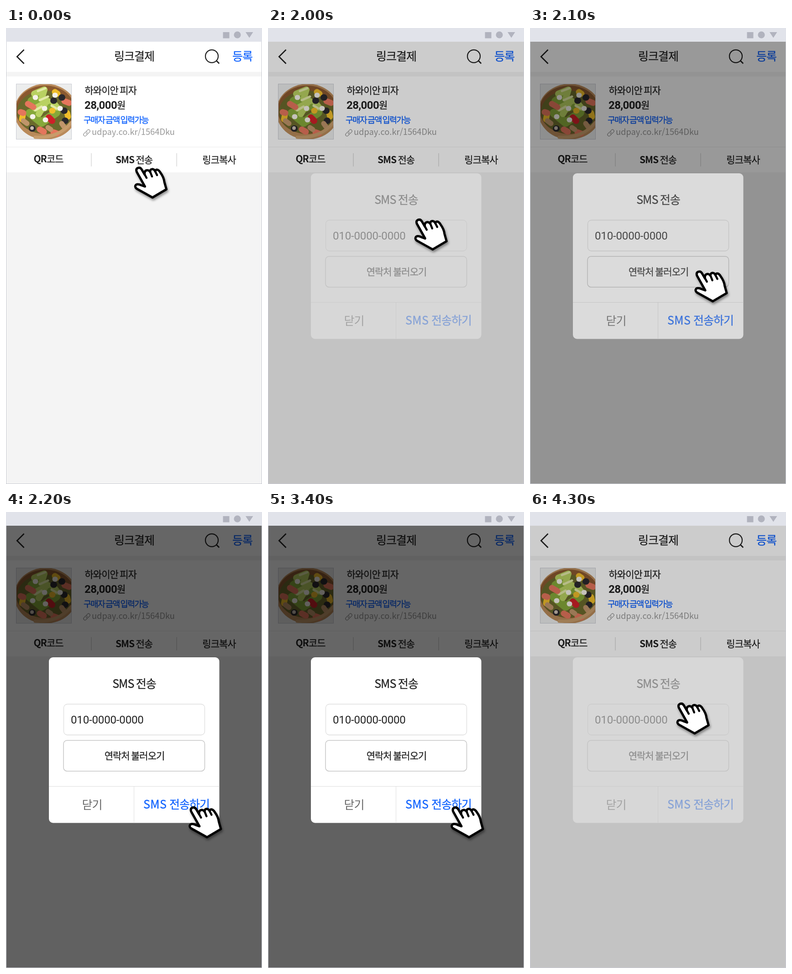
Write an HTML page that moves like this. It is 561 by 998 pixels and loops after 4.4 s.

```html
<!DOCTYPE html>
<html lang="ko">
<head>
<meta charset="utf-8">
<title>링크결제</title>
<style>
  html, body { margin: 0; width: 100%; height: 100%; overflow: hidden; }
  svg { display: block; }
  text {
    font: 21px "Noto Sans CJK KR", "Noto Sans CJK JP", "Noto Sans CJK", sans-serif;
    letter-spacing: -1px; word-spacing: -1.5px; fill: currentColor; color: #222; white-space: pre;
  }
  .medium { stroke: currentColor; stroke-width: .3px; }
  .bold { font-weight: 700; stroke: none; }
  .large { font-size: 25px; }
  .mid { text-anchor: middle; }
  .blue { color: #0f62fe; }
  .roboto { font-family: Roboto, sans-serif; font-size: 24px; }
  .line { fill: none; stroke: #222; stroke-width: 2.7; }
  .food path { fill: none; stroke-linecap: round; stroke-linejoin: round; }
  #hand { filter: drop-shadow(2px 4px 2.5px rgba(0, 0, 0, .4)); }
</style>
</head>
<body>
<svg id="stage" width="561" height="998" viewBox="0 0 561 998">
  <rect width="561" height="998" fill="#c9cbd3"/>
  <rect width="561" height="30" fill="#e1e3ea"/>
  <path fill="#b1b3be" d="M475.5 9h14v13.500h-14zM525 9h16.500l-8.250 12.500z"/>
  <circle cx="507" cy="15" r="7.600" fill="#b1b3be"/>

  <rect x="1" y="30" width="559" height="967" fill="#f4f4f4"/>
  <path fill="#fff" d="M1 30h559v66H1zM1 106h559v210H1z"/>
  <path class="line" d="M39.500 47.500L24.200 62.700L39.500 78"/>
  <circle class="line" cx="451" cy="61.800" r="14" style="stroke-width:2.200"/>
  <path class="line" d="M461 71.500L467.200 77.700"/>
  <text class="large medium mid" x="281" y="71">링크결제</text>
  <text class="large medium mid blue" x="518" y="71">등록</text>

  <svg class="food" x="22" y="122" width="122" height="122" viewBox="22 122 122 122">
    <rect x="22" y="122" width="122" height="122" fill="#eceded"/>
    <ellipse cx="87" cy="183" rx="69" ry="61" fill="#b98a5a"/>
    <ellipse cx="86" cy="179" rx="65" ry="53" fill="#8a5930"/>
    <ellipse cx="85" cy="184" rx="61" ry="47" fill="#6b6a2c"/>
    <path stroke="#86a83a" stroke-width="18" d="M56 160L75 148L70 180L98 168M110 185L78 207L52 186"/>
    <path stroke="#b9d162" stroke-width="14" d="M62 144L84 135L78 155L92 160M64 176L86 164L72 188M112 174L104 164"/>
    <path stroke="#e3eaa8" stroke-width="5" d="M70 138L86 132M74 158L92 150M64 180L78 172M100 170L110 176"/>
    <path stroke="#f0bd2a" stroke-width="13" d="M107 140L113 144M134 186L136 194M37 190L35 200M101 181h1"/>
    <path stroke="#e4765c" stroke-width="13" d="M48 166L60 173M32 184L38 186M74 222L83 227M104 228L112 231M128 160L138 164"/>
    <path stroke="#cf2028" stroke-width="14" d="M94 196L101 203"/>
    <path stroke="#2a282d" stroke-width="14" d="M127 181h1M129 203h1M104 159h1M57 220h1M122 152h1"/>
    <path stroke="#c0956a" stroke-width="11" d="M122 209L127 216M38 203L46 209M92 218L98 222"/>
    <path stroke="#f6f2ea" stroke-width="11" d="M86 201h1M107 147h1M58 194h1M64 152h1M118 176h1M84 176h1"/>
    <circle cx="57" cy="219" r="4" fill="#c9bdb0"/>
    <path stroke="#c79c6b" stroke-width="7" d="M64 239Q115 242 143 207"/>
    <rect x="22.500" y="122.500" width="121" height="121" fill="none" stroke="#c9cbd3"/>
  </svg>

  <text class="medium" x="172.500" y="144">하와이안 피자</text>
  <text class="roboto bold" x="172" y="177" style="letter-spacing:-.6px">28,000</text>
  <text class="medium" x="243" y="176">원</text>
  <text class="medium blue" x="170" y="208" style="font-size:18.500px;letter-spacing:-1.700px">구매자 금액 입력가능</text>
  <text x="188" y="234" style="font-size:18.300px;letter-spacing:0;color:#999">udpay.co.kr/1564Dku</text>
  <g transform="translate(177 229.500) rotate(-45)" fill="none" stroke="#999" stroke-width="1.300">
    <path d="M-1 3.200H-5.500A3.200 3.200 0 0 1 -5.500 -3.200H-1.500A3.200 3.200 0 0 1 1.500 1M1 -3.200H5.500A3.200 3.200 0 0 1 5.500 3.200H1.500A3.200 3.200 0 0 1 -1.500 -1"/>
  </g>

  <path fill="none" stroke="#ececec" d="M1 260.500H560"/>
  <path fill="none" stroke="#d9d9d9" stroke-width="1.500" d="M187 274v29M374 274v29"/>
  <text class="medium mid" x="93" y="294"><tspan class="bold">QR</tspan>코드</text>
  <text class="medium mid" x="280.500" y="295.500"><tspan class="bold">SMS</tspan> 전송</text>
  <text class="medium mid" x="467" y="296">링크복사</text>

  <rect id="shade" x="1" y="30" width="559" height="967" opacity="0"/>

  <g id="dialog" opacity="0">
    <rect x="94" y="318" width="373.500" height="362.500" rx="9" fill="#fff"/>
    <g fill="none">
      <rect x="126.500" y="420.500" width="309" height="67.500" rx="8" stroke="#ddd" stroke-width="1.300"/>
      <rect x="126" y="499.700" width="309.500" height="67.500" rx="8" stroke="#c6c6c6" stroke-width="1.500"/>
      <path stroke="#ddd" d="M94 600.500H467.500M280.500 600.500V680.500"/>
    </g>
    <text class="large medium mid" x="281" y="385">SMS 전송</text>
    <text class="roboto" x="142" y="462.500" style="letter-spacing:-.15px">010-0000-0000</text>
    <text class="medium mid" x="281.500" y="541">연락처 불러오기</text>
    <text class="large mid" x="188.500" y="650" style="color:#666">닫기</text>
    <text class="large medium mid blue" x="373.500" y="649"><tspan style="letter-spacing:.3px">SMS </tspan>전송하기</text>
  </g>

  <g id="hand" fill="#fff" stroke="#000" stroke-width="5" stroke-linejoin="round" stroke-linecap="round">
    <path d="M321 371L286 351.500Q281 347 285 343Q289 340.500 296 344L304.500 347L286.500 315Q284 309 288.500 306.500Q294.500 304 297.500 310L304 321C302 311 311 308 316 315C315 307 324 307 327 314C328 308 334 309 338 316Q346 327 347 337L351.500 353Z"/>
    <path fill="none" stroke-width="4.500" d="M303 319L308 328M316 315L320 325M327 314L331 322"/>
  </g>
</svg>
<script>
  const [shade, dialog, hand] = ["shade", "dialog", "hand"].map(id => document.getElementById(id));
  const LOOP = 4400, OPEN = 2000, CLOSE = 4200, STEP = 100, LAST = 3;

  // Opening and closing both advance in hard 100 ms steps.
  function stepAt(t) {
    if (t < OPEN) return 0;
    if (t < CLOSE) return Math.min(LAST, 1 + Math.floor((t - OPEN) / STEP));
    return LAST - 1 - Math.floor((t - CLOSE) / STEP);
  }

  function draw() {
    const step = stepAt(performance.now() % LOOP);
    shade.setAttribute("opacity", step * 0.2);
    dialog.setAttribute("opacity", step / LAST);
    hand.setAttribute("transform", `translate(${step * 39.8} ${step * 113.6})`);
    requestAnimationFrame(draw);
  }
  draw();
</script>
</body>
</html>
```
